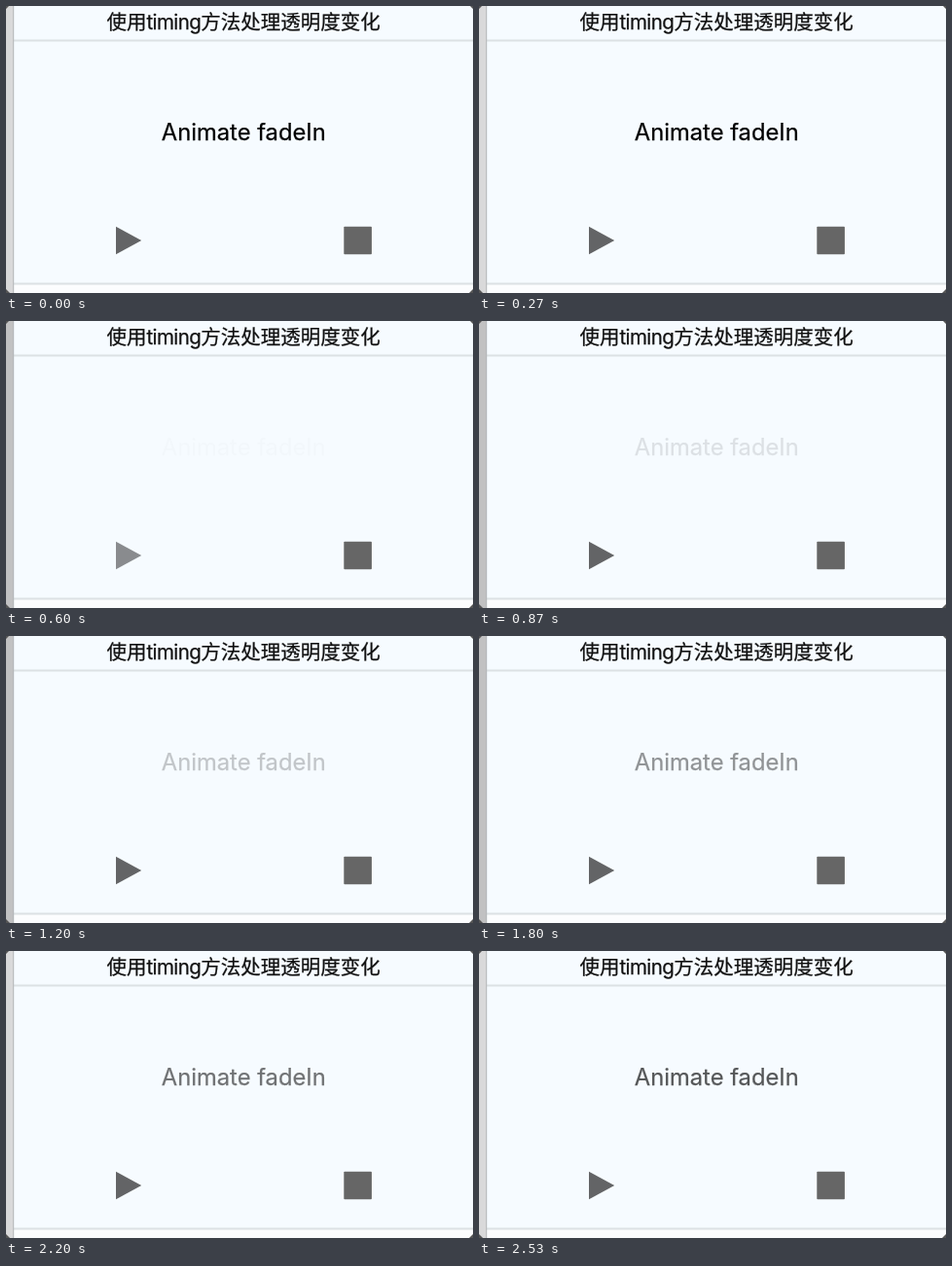
An HTML page for the animation above (2590 ms loop, 480 by 295 pixels).

```html
<!DOCTYPE html>
<html lang="zh">
<head>
<meta charset="utf-8">
<style>
  html, body { margin: 0; width: 100%; height: 100%; overflow: hidden; background: #f6fbff; }
  svg { display: block; width: 480px; height: 295px; }
  text { stroke-width: .25px; }
  .title { font: 20.5px Inter, "Noto Sans CJK SC", "Noto Sans CJK", sans-serif; fill: #111; stroke: #111; }
  .latin { letter-spacing: -.6px; }
  .label { font: 23.75px Inter, "Liberation Sans", sans-serif; fill: #000; stroke: #000; }
</style>
</head>
<body>
<svg viewBox="0 0 480 295">
  <rect width="480" height="295" fill="#f6fbff"/>
  <rect y="286" width="480" height="9" fill="#fcfdfe"/>
  <path d="M8 35.4H480M8 285.4H480" stroke="#dce1e4" stroke-width="2"/>
  <rect id="edge" width="8" height="295"/>
  <path d="M7.7 0V295" stroke="#b4b7b9" stroke-width="1"/>
  <path d="M0 0H3L0 3ZM480 0H477L480 3ZM0 295V291L4 295ZM480 295V291L476 295Z" fill="#555"/>
  <text class="title" x="103.5" y="24">使用<tspan class="latin">timing</tspan>方法处理透明度变化</text>
  <text id="label" class="label" x="159.8" y="138">Animate fadeIn</text>
  <path id="play" d="M113 226.8L139.2 241L113 255.2Z" fill="#636466"/>
  <rect x="347.3" y="226.8" width="28.6" height="28.4" rx=".8" fill="#666"/>
</svg>
<script>
  const LOOP = 2590;
  const PRESS = 600, RELEASE = 670;
  const STEPS = [600, 670, 870, 1000, 1070, 1200, 1400, 1530, 1670, 1800, 1930, 2130, 2200, 2330, 2470, 2530];
  const [edge, label, play] = ['edge', 'label', 'play'].map(id => document.getElementById(id));

  // The fade is linear, sampled at uneven screen updates.
  function fade(t) {
    if (t < PRESS) return 1;
    const at = STEPS.filter(s => s <= t).pop();
    return 0.01 + (at - PRESS) * 0.000335;
  }

  function draw(now) {
    const t = now % LOOP;
    label.setAttribute('opacity', fade(t));
    play.setAttribute('opacity', t >= PRESS && t < RELEASE ? 0.74 : 1);
    edge.setAttribute('fill', t >= 530 && t < 2130 ? '#c1c1c2' : '#d9d9da');
  }

  const start = performance.now();
  function tick() {
    draw(performance.now() - start);
    requestAnimationFrame(tick);
  }
  tick();
</script>
</body>
</html>
```
